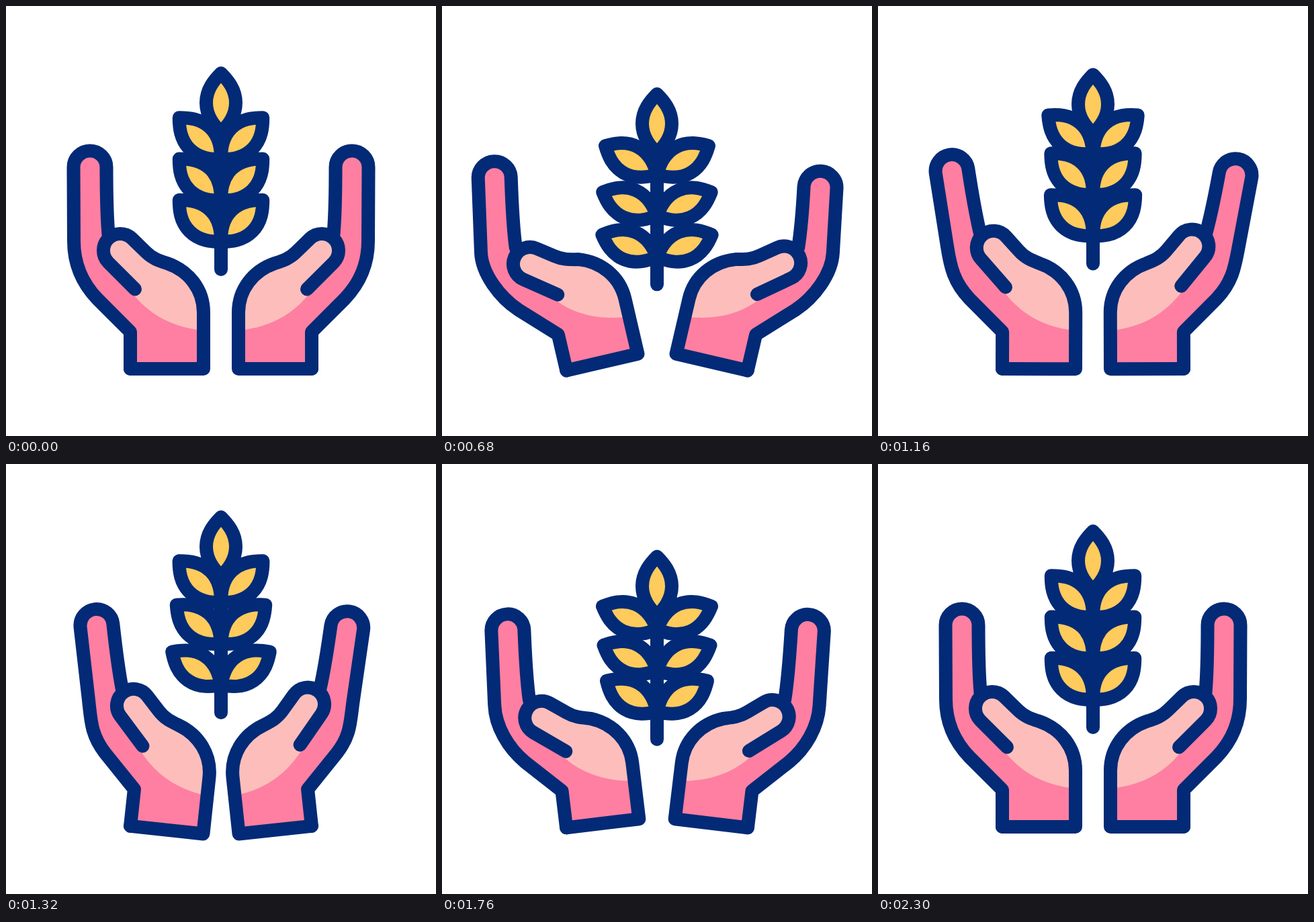
These frames come from a looping animation (640x640 px, 2.4 s). An HTML page:

```html
<!DOCTYPE html>
<html lang="en">
<head>
<meta charset="utf-8">
<title>Hands and wheat</title>
<style>
  html, body { margin: 0; width: 100%; height: 100%; overflow: hidden; background: #fff; }
  svg { display: block; width: 100vw; height: 100vh; }
  .line { fill: none; stroke: #032a76; stroke-width: 20; stroke-linecap: round; stroke-linejoin: round; }
  .skin { fill: #fe7fa1; }
  .palm { fill: #fdbebb; }
  .leaf { fill: #fecb5c; }
</style>
</head>
<body>
<svg id="stage" viewBox="0 0 640 640"></svg>
<script>
const LOOP = 2400, START = 200, END = 2300, SWAY = 905;
const stage = document.getElementById('stage');

function add(parent, tag, attrs = {}) {
  const el = document.createElementNS('http://www.w3.org/2000/svg', tag);
  for (const key in attrs) el.setAttribute(key, attrs[key]);
  return parent.appendChild(el);
}

const clamp = p => Math.min(1, Math.max(0, p));
const ease = p => 0.5 - 0.5 * Math.cos(Math.PI * p);
const arch = p => Math.sin(Math.PI * clamp(p));

// Keys are [position, value] pairs joined by sine easing.
function track(keys) {
  return x => {
    const i = keys.findIndex(([pos]) => x < pos);
    if (i < 1) return 0;
    const [x0, v0] = keys[i - 1], [x1, v1] = keys[i];
    return v0 + (v1 - v0) * ease((x - x0) / (x1 - x0));
  };
}
const beats = (...values) => track(values.map((v, i) => [i, v]));

function rotate([x, y], [cx, cy], deg) {
  const a = deg * Math.PI / 180, c = Math.cos(a), s = Math.sin(a);
  return [cx + (x - cx) * c - (y - cy) * s, cy + (x - cx) * s + (y - cy) * c];
}

// The motion has four beats that get slightly quicker.
const progress = t => clamp((t - START) / (END - START));
const phase = u => u * (3.22 + 0.78 * u);

const wristTurn = beats(0, -14.8, 6.3, -7.9, 0);
const thumbTurn = beats(0, -8, 3.8, -8, 0);
const bob = beats(0, 25.3, -22.5, 21, 0);
const fingerTurn = track([[200, 0], [660, 11.2], [1330, -12.4], [1640, 4.8], [1920, 4.3], [2300, 0]]);

// Two swings that begin after the given delay.
function swing(t, delay) {
  const p = (t - START - delay) / SWAY;
  return p <= 0 || p >= 2 ? 0 : ease(2 * p);
}

// The right hand is a mirrored copy that follows a little looser.
const hands = [
  { mirror: '', loose: 0 },
  { mirror: 'translate(640 0) scale(-1 1)', loose: 1 }
];

for (const hand of hands) {
  const g = add(stage, 'g', { transform: hand.mirror });
  hand.skin = add(g, 'path', { class: 'skin' });
  hand.back = add(g, 'path', { class: 'line' });
  hand.palm = add(g, 'path', { class: 'palm' });
  hand.front = add(g, 'path', { class: 'line' });
}

function drawHand(hand, t) {
  const u = progress(t), lag = hand.loose * arch(u);
  const turn = wristTurn(phase(u));
  const curl = thumbTurn(phase(u) + 0.3 * arch(u)) + 2 * lag;
  const bend = fingerTurn(t) - 1.7 * lag;
  const tip = 240 + hand.loose * 14 * arch(clamp((t - START) / 1400) ** 0.6) ** 2;

  const body = p => rotate(p, [196, 540], turn);
  const show = p => p.map(n => n.toFixed(2)).join(' ');
  const B = (x, y) => show(body([x, y]));
  const F = (x, y) => show(body(rotate([x, y], [154, 344], bend)));
  const T = (x, y) => show(body(rotate([x, y], [236, 383], curl)));

  const back = `M${F(153, 345)} C${F(150, 315)} ${F(149.5, 285)} ${F(149.5, tip)}`
    + ` A24.5 24.5 0 0 0 ${F(100.5, tip)} L${F(101, 350)}`
    + ` C${F(101, 382)} ${B(113, 412)} ${B(136, 436)} L${B(185, 485)} L${B(185, 540)}`;
  const top = `L${B(294, 456)} C${B(294, 422)} ${B(272, 394)} ${B(240, 383)}`
    + ` C${T(228, 379)} ${T(218, 376)} ${T(208, 366)} L${T(187.7, 346.3)}`
    + ` A25 25 0 0 0 ${T(152.3, 381.7)}`;

  hand.back.setAttribute('d', back);
  hand.skin.setAttribute('d', `${back} L${B(294, 540)} L${B(294, 456)} L${B(240, 395)} Z`);
  hand.front.setAttribute('d', `M${B(185, 540)} L${B(294, 540)} ${top} L${T(192, 421.4)}`);
  hand.palm.setAttribute('d',
    `M${B(294, 483)} ${top} L${T(180, 416)} C${B(206, 456)} ${B(244, 478)} ${B(294, 483)} Z`);
}

// A leaf stands on its base at the origin and points up.
const LEAF = 'M0 0 C-10 -10 -22 -24 -22 -44 C-22 -64 -10 -78 0 -88'
  + ' C10 -78 22 -64 22 -44 C22 -24 10 -10 0 0 Z';

const ear = add(stage, 'g');
add(ear, 'path', { class: 'line', d: 'M320 205 V392' });

function addLeaf(row, side) {
  const el = add(ear, 'g');
  add(el, 'path', { class: 'leaf', d: LEAF });
  add(el, 'path', { class: 'line', d: LEAF });
  return { el, row, side };
}

const leaves = [];
for (let row = 0; row < 3; row++) leaves.push(addLeaf(row, -1), addLeaf(row, 1));
const crown = addLeaf(3, 0);

// Each row starts its sway a moment after the one below.
function drawEar(t) {
  const sway = row => (23.3 - 0.6 * row) * swing(t, 94 * row);
  ear.setAttribute('transform', `translate(0 ${bob(phase(progress(t)))})`);
  for (const { el, row, side } of leaves) {
    el.setAttribute('transform', `translate(320 ${351 - 61.3 * row}) rotate(${side * (45 + sway(row))})`);
  }
  crown.el.setAttribute('transform', `translate(320 ${188 + sway(crown.row)})`);
}

function render(t) {
  hands.forEach(hand => drawHand(hand, t));
  drawEar(t);
}

const origin = performance.now();
function tick() {
  render((performance.now() - origin) % LOOP);
  requestAnimationFrame(tick);
}
tick();
</script>
</body>
</html>
```
